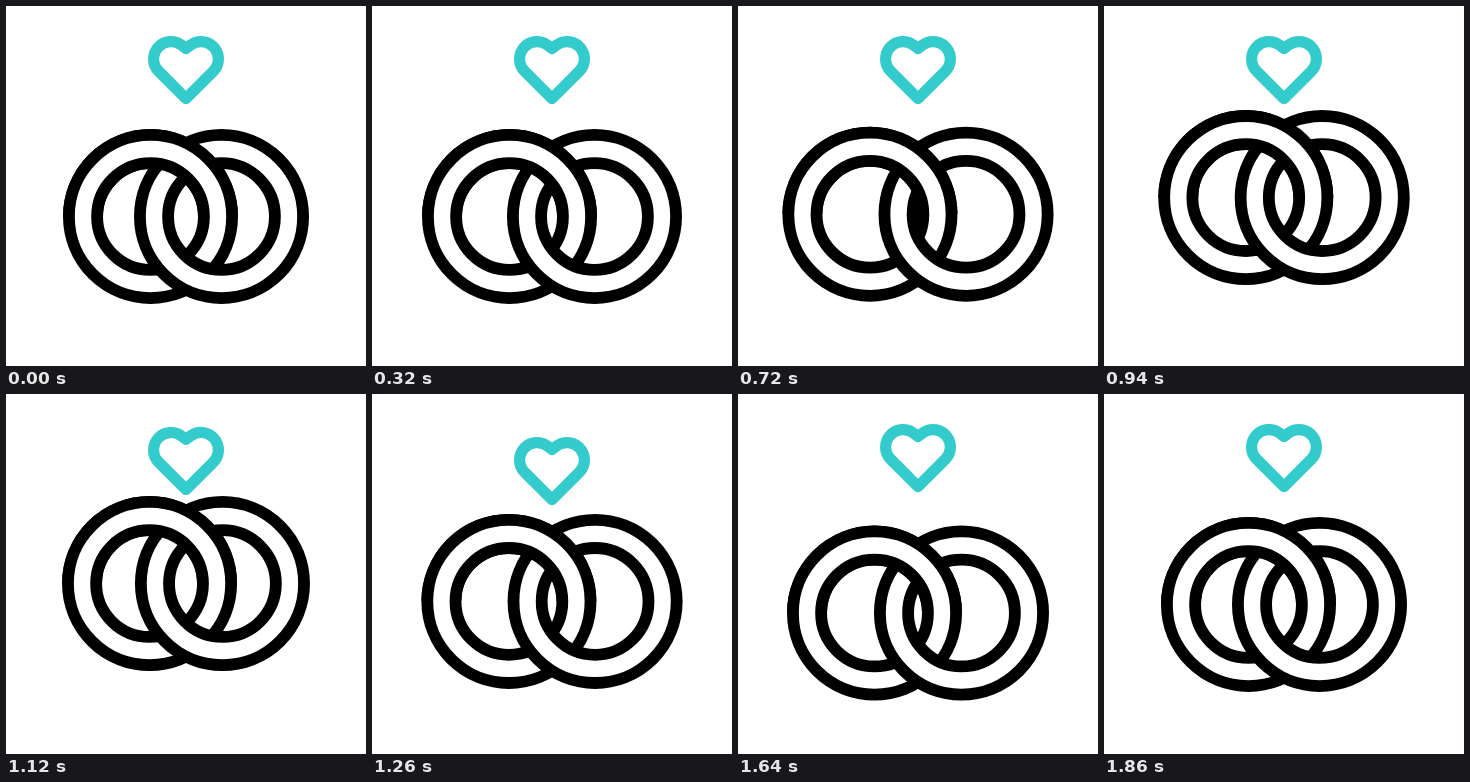
Animation of 360x360 px, one loop 2480 ms. Source, as an HTML page with a canvas:

```html
<!DOCTYPE html>
<html lang="en">
<head>
<meta charset="utf-8">
<title>Wedding rings</title>
<style>
  html, body { margin: 0; height: 100%; overflow: hidden; background: #fff; }
  canvas { display: block; }
</style>
</head>
<body>
<canvas id="stage" width="360" height="360"></canvas>
<script>
const ctx = document.getElementById('stage').getContext('2d');
const LOOP = 2480, TEAL = '#33cbcb', { PI } = Math;

// Keyframes as [time, value] pairs, eased in and out between neighbours
const spread = [[0, 0], [640, 13.9], [1060, 0], [1450, 14.5], [1860, 0]];
const lift = [[640, 0], [1060, -23.5], [1450, 15.5], [1860, 0]];
const heartY = [[1060, 0], [1260, 13], [1480, -8], [1620, 0]];
const sparkTip = [[1320, 0], [1420, 1]];
const sparkTail = [[1480, 0], [1600, 1]];

function at(keys, t) {
  if (t <= keys[0][0]) return keys[0][1];
  for (let i = 1; i < keys.length; i++) {
    const [t0, a] = keys[i - 1], [t1, b] = keys[i];
    if (t < t1) {
      const p = (t - t0) / (t1 - t0);
      return a + (b - a) * p * p * (3 - 2 * p);
    }
  }
  return keys[keys.length - 1][1];
}

function stroke(color, width) {
  ctx.strokeStyle = color;
  ctx.lineWidth = width;
  ctx.stroke();
}

function ring(x, y) {
  ctx.beginPath();
  ctx.arc(x, y, 67.5, 0, 2 * PI);
  stroke('#000', 40);
  stroke('#fff', 16.4);
}

function rings(t) {
  const d = at(spread, t), y = 210.5 + at(lift, t);
  const left = 144.5 - d, right = 215.5 + d;
  ring(left, y);
  ring(right, y);
  // The left ring passes over the right one in the upper half
  ctx.save();
  ctx.beginPath();
  ctx.rect(0, 0, 360, Math.round(y));
  ctx.clip();
  ring(left, y);
  ctx.restore();
}

function heart(dy) {
  ctx.save();
  ctx.translate(0, dy);
  ctx.beginPath();
  ctx.moveTo(180, 92.6);
  ctx.arc(165, 53, 17.4, 0.75 * PI, -0.96);
  ctx.lineTo(180, 42.4);
  ctx.arc(195, 53, 17.4, PI + 0.96, 0.25 * PI);
  ctx.closePath();
  stroke(TEAL, 11.2);
  ctx.restore();
}

function sparks(t) {
  const tip = at(sparkTip, t), tail = at(sparkTail, t);
  if (tip <= tail) return;
  for (const side of [-1, 1]) {
    for (const [y, rise] of [[52.7, -4.2], [81.6, 3.9]]) {
      ctx.beginPath();
      for (const p of [tail, tip]) ctx.lineTo(180 + side * (61 + 8.3 * p), y + rise * p);
      stroke(TEAL, 11.2);
    }
  }
}

function draw(now) {
  const t = now % LOOP;
  ctx.fillStyle = '#fff';
  ctx.fillRect(0, 0, 360, 360);
  ctx.lineCap = ctx.lineJoin = 'round';
  rings(t);
  heart(at(heartY, t));
  sparks(t);
}

const start = performance.now();
function tick() {
  draw(performance.now() - start);
  requestAnimationFrame(tick);
}
tick();
</script>
</body>
</html>
```
